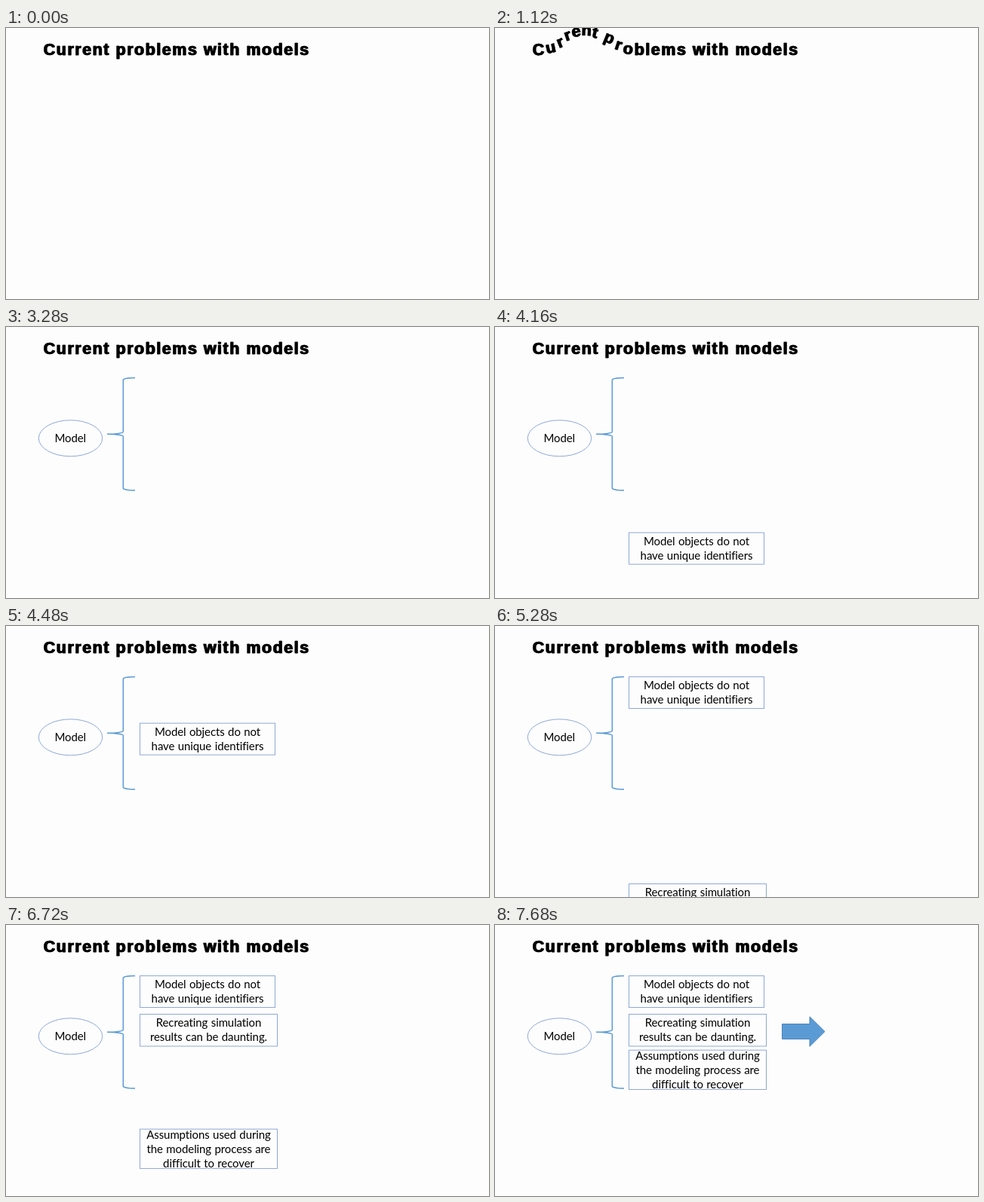
Recreate the animation shown at these times as an HTML page with a canvas. Size 640 px wide and 360 px high, loop 8000 ms.

```html
<!DOCTYPE html>
<html lang="en">
<head>
<meta charset="utf-8">
<title>Current problems with models</title>
<style>
  html, body { margin: 0; width: 100%; height: 100%; overflow: hidden; background: #fdfdfd; }
  canvas { display: block; }
</style>
</head>
<body>
<canvas id="stage" width="640" height="360"></canvas>
<script>
const ctx = document.getElementById('stage').getContext('2d');
const LOOP = 8000, STEP = 80;
const TITLE = 'Current problems with models';
const TITLE_FONT = 'bold 21.4px "Liberation Sans", sans-serif';
const BODY_FONT = '15px Lato, sans-serif';
const OUTLINE = '#8fa8d8', BLUE = '#5b9bd5';
const FLY_TIME = 650;

const boxes = [
  { start: 3967, y: 67.5, w: 179, h: 42, baseline: 16.5,
    lines: ['Model objects do not', 'have unique identifiers'] },
  { start: 5233, y: 118.5, w: 182, h: 42.5, baseline: 16.5,
    lines: ['Recreating simulation', 'results can be daunting.'] },
  { start: 6422, y: 166.2, w: 182, h: 52.3, baseline: 12.4,
    lines: ['Assumptions used during', 'the modeling process are', 'difficult to recover'] }
];

const clamp = v => Math.min(1, Math.max(0, v));
const easeInOut = p => p < .5 ? 2 * p * p : 1 - 2 * (1 - p) * (1 - p);

// A wave of hops runs through the letters; each letter leans into its own hop.
function drawTitle(t) {
  ctx.font = TITLE_FONT;
  ctx.letterSpacing = '1.57px';
  ctx.textAlign = 'left';
  ctx.fillStyle = ctx.strokeStyle = '#000';
  ctx.lineWidth = .4;
  ctx.lineJoin = 'miter';
  const crest = (t - 925) / 40.6;
  let index = 0;
  [...TITLE].forEach((letter, i) => {
    if (letter === ' ') return;
    const half = ctx.measureText(letter).width / 2;
    const x = 49 + ctx.measureText(TITLE.slice(0, i)).width + half;
    const phase = clamp(.5 + (crest - index++) / 10);
    const lift = 26 * easeInOut(1 - Math.abs(2 * phase - 1));
    const lean = 25 * (1 - Math.abs((phase * 4) % 2 - 1)) * (phase < .5 ? 1 : -1);
    ctx.save();
    ctx.translate(x, 27.5 - lift);
    ctx.rotate(lean * Math.PI / 180);
    // Two shifted copies widen the stems to a black weight.
    for (const shift of [.3, 1.3]) {
      ctx.fillText(letter, shift - half, 8.5);
      ctx.strokeText(letter, shift - half, 8.5);
    }
    ctx.restore();
  });
}

function bodyText(text, x, y) {
  ctx.font = BODY_FONT;
  ctx.letterSpacing = '-0.1px';
  ctx.wordSpacing = '0.7px';
  ctx.textAlign = 'center';
  ctx.fillStyle = '#000';
  ctx.fillText(text, x, y);
  ctx.wordSpacing = '0px';
}

function drawModel() {
  ctx.strokeStyle = OUTLINE;
  ctx.lineWidth = 1;
  ctx.beginPath();
  ctx.ellipse(85.5, 147.8, 42.2, 24, 0, 0, 2 * Math.PI);
  ctx.stroke();
  bodyText('Model', 85.2, 153);
}

function drawBrace() {
  ctx.strokeStyle = BLUE;
  ctx.lineWidth = 1.5;
  ctx.stroke(new Path2D(
    'M171 67.5A15.7 3 0 0 0 155.3 70.5V139.3A21 3 0 0 1 134 142.3' +
    'A21 3 0 0 1 155.3 145.3V214A15.7 3 0 0 0 171 217'));
}

function drawBox(box, t) {
  const y = 360 + (box.y - 360) * clamp((t - box.start) / FLY_TIME);
  ctx.strokeStyle = OUTLINE;
  ctx.lineWidth = 1;
  ctx.strokeRect(177.5, y, box.w, box.h);
  box.lines.forEach((line, i) =>
    bodyText(line, 177.5 + box.w / 2, y + box.baseline + 19 * i));
}

function drawArrow() {
  const arrow = new Path2D('M380.5 131.5H417V121.8L437 141.5L417 161.3V151.5H380.5Z');
  ctx.fillStyle = BLUE;
  ctx.fill(arrow);
  ctx.strokeStyle = '#4a84bb';
  ctx.lineWidth = 1;
  ctx.stroke(arrow);
}

function draw() {
  const t = Math.floor(performance.now() % LOOP / STEP) * STEP;
  ctx.fillStyle = '#fdfdfd';
  ctx.fillRect(0, 0, 640, 360);
  drawTitle(t);
  if (t >= 2800) drawModel();
  if (t >= 3280) drawBrace();
  boxes.forEach(box => { if (t >= box.start) drawBox(box, t); });
  if (t >= 7680) drawArrow();
  requestAnimationFrame(draw);
}
draw();
</script>
</body>
</html>
```
